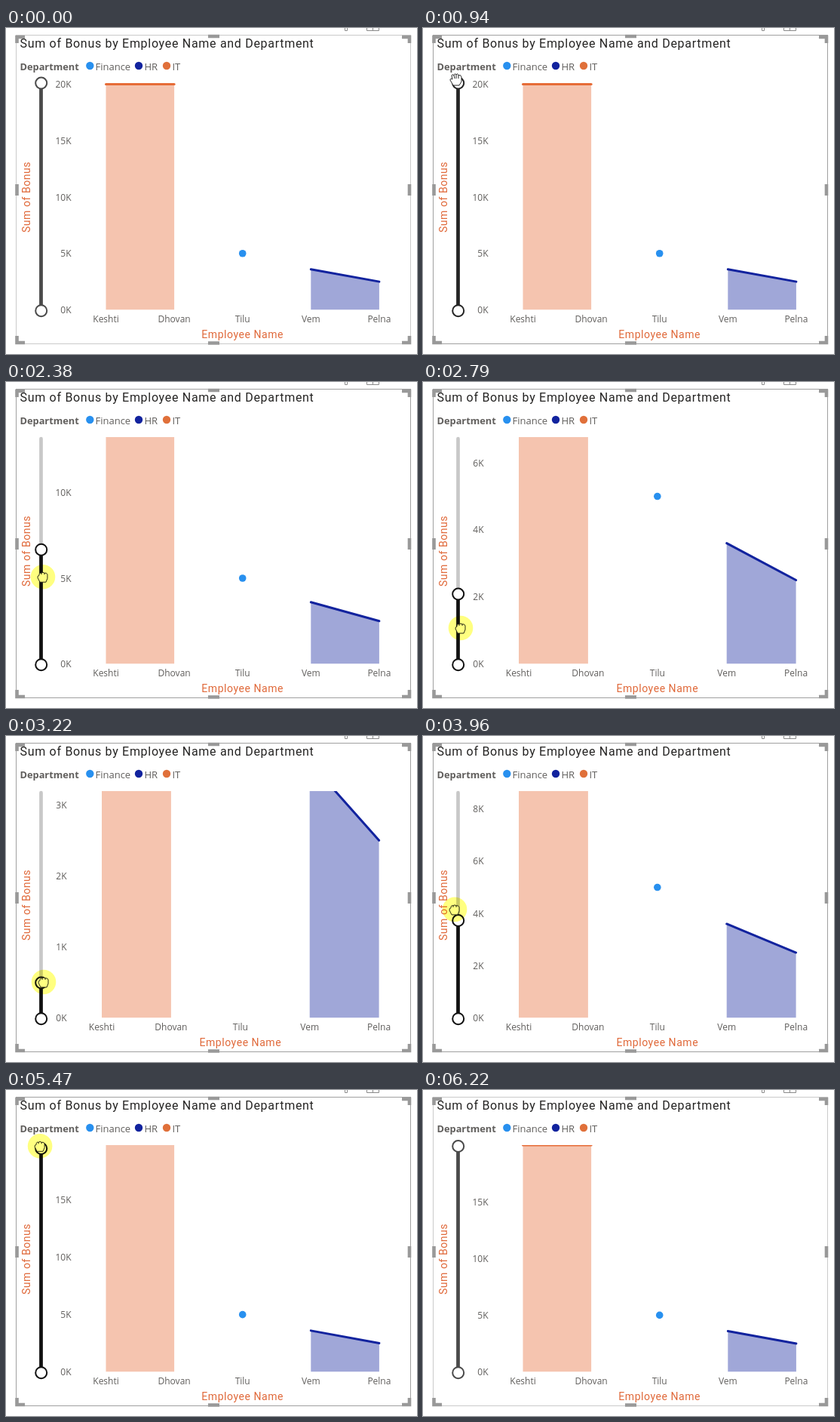
Animation, 545 px wide and 432 px high, one loop 6.88 s. Source, as an HTML page:

```html
<!DOCTYPE html>
<html lang="en">
<head>
<meta charset="utf-8">
<title>Bonus chart with zoom slider</title>
<style>
  html, body { margin: 0; width: 100%; height: 100%; overflow: hidden; background: #fff; }
  svg { display: block; width: 545px; height: 432px; }
  text { font: 12px "Open Sans", sans-serif; fill: #605e5c; }
  .legend { font-size: 13px; }
  .strong { font-weight: 700; font-size: 12.8px; }
  .title { font: 16px Roboto, sans-serif; letter-spacing: .7px; fill: #252423; }
  .axis { font: 14px Roboto, sans-serif; letter-spacing: .55px; fill: #e0693a; text-anchor: middle; }
  .mid { text-anchor: middle; }
  .end { text-anchor: end; }
  #glow { mix-blend-mode: multiply; }
</style>
</head>
<body>
<svg viewBox="0 0 545 432">
  <defs><clipPath id="plot"><rect x="100" y="73" width="420" height="300.5"/></clipPath></defs>
  <g fill="none" stroke="#8a8a8a">
    <path d="M449.5 0V3.5H452.5V0M478.5 0V3.5H494.5V0M486.5 0V3.5"/>
    <rect id="border" x="13.5" y="9.5" width="523" height="409"/>
    <path stroke="#999" stroke-width="4.6" d="M14.5 20V12H25M525 12H535V20M14.5 408V417H25M525 417H535V408
      M268 11H283M268 417.5H283M14.5 207V222M535 207V222"/>
  </g>
  <text class="title" x="18.5" y="26">Sum of Bonus by Employee Name and Department</text>
  <text class="legend strong" x="18.5" y="56">Department</text>
  <circle cx="111.3" cy="50" r="5.2" fill="#2890ef"/><text class="legend" x="118.5" y="56">Finance</text>
  <circle cx="176" cy="50" r="5.2" fill="#12239e"/><text class="legend" x="183.5" y="56">HR</text>
  <circle cx="213" cy="50" r="5.2" fill="#e0703a"/><text class="legend" x="220.5" y="56">IT</text>
  <text class="axis" transform="translate(32 224) rotate(-90)">Sum of Bonus</text>
  <g id="chart"></g>
  <g id="slider" stroke-linecap="round"></g>
  <path id="cursor" fill="#fff" stroke="#111" stroke-width=".9" stroke-linejoin="round"/>
  <circle id="glow" r="16.3" fill="#ffff80"/>
</svg>
<script>
const LOOP = 6880, ENTER = 130, PRESS = 1340, RETURN = 3480, RELEASE = 5610, LEAVE = 6220;
const TOP = 73, LOW = 327, TRACK_END = 375;   // slider positions
const BASE = 373.5, HEIGHT = 299;             // plot area
const names = ["Keshti", "Dhovan", "Tilu", "Vem", "Pelna"];
const byId = id => document.getElementById(id);

// Pointer waypoints: time, x, y
const pointerPath = [[ENTER, 365, 405], [490, 145, 270], [800, 50, 75], [940, 44, 68], [PRESS, 46, 70],
  [2756, 50, 326], [RETURN, 50, 326], [3960, 42, 230], [4780, 47, 130], [5500, 45, 72],
  [RELEASE, 44, 76], [LEAVE, 480, 440]];
// The knob on its way back up: time, y
const knobRise = [[RETURN, LOW], [3960, 244.6], [4780, 147], [5500, 74.5]];

const shapes = {
  arrow: "M0 0V15L3.5 12L6 17.5L8.5 16.5L6 11H11Z",
  open: "M-4 8L-8 1Q-8 -2 -5 0L-6 -5Q-5 -8 -3 -5Q-2 -9 0 -6Q2 -9 3 -5Q6 -7 7 -3V3L4 8ZM-3 -5L-2 -1M0 -6V-1M3 -5V-1",
  closed: "M-4 7L-7 1Q-7 -2 -5 -2Q-5 -6 -2 -5Q0 -7 2 -5Q5 -6 6 -3V2L4 7ZM-2 -5V-3M2 -5V-3"
};

// Linear interpolation along waypoints
function along(path, t) {
  const next = path.findIndex(point => point[0] > t);
  if (next <= 0) return path.at(next).slice(1);
  const from = path[next - 1], to = path[next];
  const p = (t - from[0]) / (to[0] - from[0]);
  return from.slice(1).map((v, i) => v + (to[i + 1] - v) * p);
}

// Slider position on the way down; the plot starts more slowly than the knob
function pulledDown(t, duration, power) {
  const p = Math.min(1, Math.max(0, (t - PRESS) / duration));
  return TOP + (LOW - TOP) * p ** power;
}

function drawChart(max) {
  const wide = max >= 10;
  const x = i => wide ? 132.5 + 90.6 * i : 127 + 91.9 * i;
  const y = v => BASE - HEIGHT * v / max;
  const tick = wide ? 5 : max > 5 ? 2 : 1;
  const area = (i, from, to, color) => `
    <path fill="${color}" fill-opacity=".4" d="M${x(i)} ${BASE}V${y(from)}L${x(i + 1)} ${y(to)}V${BASE}Z"/>
    <path stroke="${color}" stroke-width="3" stroke-linecap="round" d="M${x(i)} ${y(from)}L${x(i + 1)} ${y(to)}"/>`;
  let out = `<g clip-path="url(#plot)">${area(0, 20, 20, "#e66c37")}${area(3, 3.6, 2.5, "#12239e")}
    <circle cx="${x(2)}" cy="${y(5)}" r="4.8" fill="#2890ef"/></g>`;
  for (let v = 0; v <= max + 1e-6; v += tick)
    out += `<text class="end" x="${wide ? 86.5 : 80.5}" y="${y(v) + 4.5}">${v}K</text>`;
  names.forEach((name, i) => out += `<text class="mid" x="${x(i)}" y="390">${name}</text>`);
  byId("chart").innerHTML = out + `<text class="axis" x="${x(2)}" y="411">Employee Name</text>`;
}

function drawSlider(knob, color) {
  const bar = (y, tone) => `<path stroke="${tone}" stroke-width="4.7" d="M46.5 ${y}V${TRACK_END}"/>`;
  const ring = y => `<circle cx="46.7" cy="${y}" r="7.5" fill="#fff" stroke="${color}" stroke-width="2"/>`;
  byId("slider").innerHTML = bar(75, "#c8c8c8") + bar(knob, color) + ring(knob) + ring(TRACK_END - .3);
}

function drawPointer(x, y, shape, visible, pressed) {
  for (const [id, shown] of [["cursor", visible], ["glow", pressed]]) {
    byId(id).setAttribute("transform", `translate(${x} ${y})`);
    byId(id).setAttribute("visibility", shown ? "visible" : "hidden");
  }
  byId("cursor").setAttribute("d", shapes[shape]);
}

function frame(now) {
  const t = now % LOOP;
  const [x, y] = along(pointerPath, t);
  const visible = t >= ENTER && t < LEAVE;
  const hover = visible && y < 419;
  const pressed = t >= PRESS && t < RELEASE;
  const rising = t >= RETURN;
  const knob = rising ? along(knobRise, t)[0] : pulledDown(t, 1772, 1);
  const zoom = rising ? knob : pulledDown(t, 1634, 2);

  drawChart(20 * (TRACK_END - zoom) / (TRACK_END - TOP));
  drawSlider(knob, pressed ? "#111" : hover ? "#252525" : "#4a4a4a");
  byId("border").setAttribute("stroke", hover ? "#a0a0a0" : "#cacaca");
  drawPointer(x, y, pressed ? "closed" : x < 56 ? "open" : "arrow", visible, pressed);
  requestAnimationFrame(frame);
}
requestAnimationFrame(frame);
</script>
</body>
</html>
```
